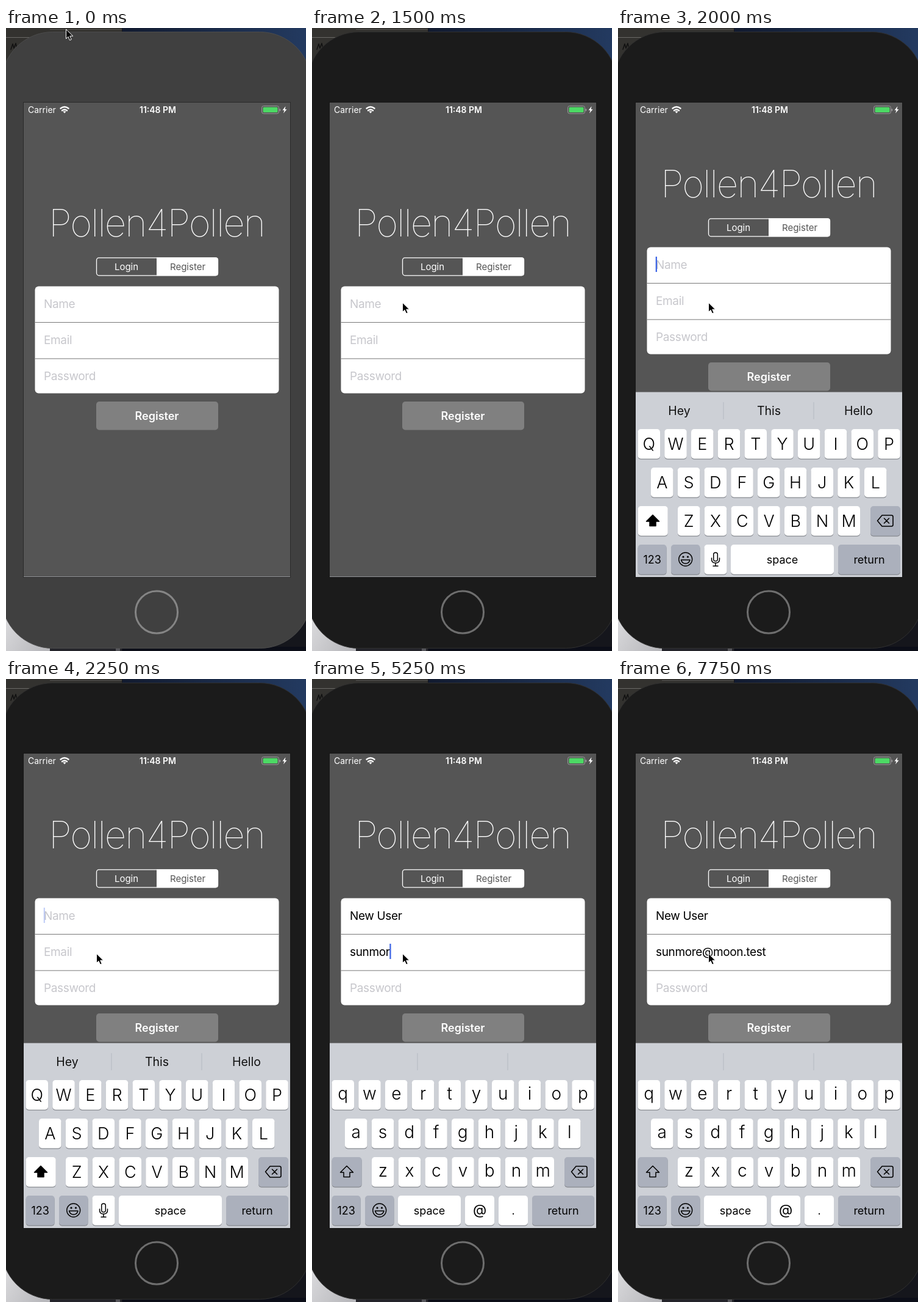
Animation of 492x1019 px, one loop 8000 ms. Source, as an HTML page:

```html
<!DOCTYPE html>
<html lang="en">
<head>
<meta charset="utf-8">
<title>Registration form</title>
<style>
  html, body { margin: 0; width: 100%; height: 100%; overflow: hidden; background: #111; }
  svg { display: block; width: 492px; height: 1019px; font-family: Inter, "Noto Sans", sans-serif; }
  .mid { text-anchor: middle; }
  .title { font-size: 62px; font-weight: 100; letter-spacing: -2px; }
  .field { font-size: 19px; letter-spacing: -.35px; }
  .keys { font-weight: 350; }
</style>
</head>
<body>
<svg id="stage" viewBox="0 0 492 1019"></svg>
<script>
const LOOP = 8000, STEP = 250;
const stage = document.getElementById('stage');
const NAME = 'New User', EMAIL = 'sunmore@moon.test';

// [time, letters typed]
const nameKeys = [[2500, 1], [2750, 2], [3000, 3], [3250, 6], [3500, 8]];
const emailKeys = [[4500, 1], [4750, 3], [5250, 6], [5500, 7], [6000, 8], [6250, 9],
  [6500, 11], [6750, 14], [7000, 16], [7250, 17]];
const hints = [[0, 'Hey,This,Hello'], [2500, '“N”,No,Not'], [2750, '“Ne”,New,Need'],
  [3000, '“New”,News,Newer'], [3250, '“Us”,User,Used'], [3750, ',,']];

const latest = (list, t, none) => list.reduce((v, [at, x]) => t >= at ? x : v, none);
const rect = (x, y, w, h, fill, r = 0, more = '') =>
  `<rect x="${x}" y="${y}" width="${w}" height="${h}" rx="${r}" fill="${fill}" ${more}/>`;
const text = (s, x, y, size, fill, more = 'class="mid"') =>
  `<text x="${x}" y="${y}" font-size="${size}" fill="${fill}" ${more}>${s}</text>`;
const path = (d, fill, stroke = 'none', w = 1) =>
  `<path d="${d}" fill="${fill}" stroke="${stroke}" stroke-width="${w}" stroke-linejoin="round" stroke-linecap="round"/>`;

function desktop() {
  return `<defs>
    <linearGradient id="sky"><stop stop-color="#121b30"/><stop offset="1" stop-color="#233a60"/></linearGradient>
    <linearGradient id="paper" x2="1" y2="1"><stop stop-color="#e8e8ea"/><stop offset="1" stop-color="#b4b4b8"/></linearGradient>
    <clipPath id="screen"><rect x="29" y="122" width="437" height="776"/></clipPath></defs>` +
    rect(0, 0, 492, 1019, '#15161c') +
    rect(0, 0, 190, 110, '#33322f') + rect(0, 15, 190, 1, '#6a6966') + rect(72, 2, 118, 1, '#555451') +
    path('M8 35l3-9 2 7 3-8 2 9', 'none', '#111', 1.5) +
    rect(191, 0, 301, 110, 'url(#sky)') +
    rect(0, 900, 72, 119, 'url(#paper)') + rect(72, 1012, 118, 7, '#24242a') +
    rect(180, 1012, 7, 7, '#55555a') + rect(191, 1012, 301, 7, '#0c0e18');
}

function phone(active) {
  const body = active ? '#1b1b1b' : '#404040';
  return rect(-7.5, 6.5, 508, 1008, body, 84, `stroke="${active ? '#303030' : '#4c4c4c'}"`) +
    rect(28, 121, 439, 778, active ? '#161616' : '#2a2a2a') +
    rect(29, 122, 437, 776, '#555') +
    `<circle cx="247" cy="955.5" r="34.5" fill="none" stroke="${active ? '#6e6e6e' : '#858585'}" stroke-width="3"/>`;
}

function statusBar() {
  return text('Carrier', 36, 139, 14, '#fff', '') +
    path('M89.5 131.5q6.5-5 13 0M92 135q4-3 8 0', 'none', '#fff', 2.4) +
    path('M93.5 136.5q2.5-1.5 5 0l-2.5 3z', '#fff') +
    text('11:48 PM', 249, 139, 14, '#fff', 'class="mid" font-weight="600"') +
    rect(419.5, 127.5, 28, 12.5, 'none', 3, 'stroke="#999"') +
    rect(421.5, 129.5, 24, 8.5, '#4cd964', 1.5) + rect(448.5, 132, 1.8, 4, '#999', 1) +
    path('M458.5 128l-5 6.5h3l-1.5 5 5.5-6.5h-3z', '#fff');
}

function field(id, value, hint, y) {
  return text(value || hint, 62, y, 19, value ? '#000' : '#c7c7cc', `class="field" id="${id}"`);
}

function form(name, email) {
  return text('Pollen4Pollen', 247, 341, 62, '#fff', 'class="mid title"') +
    rect(148.5, 375.8, 199, 29, 'none', 4, 'stroke="#fff" stroke-width="1.3"') +
    path('M247 375.2h97q4 0 4 4v22q0 4-4 4h-97z', '#fff') +
    text('Login', 197.5, 395.8, 15, '#fff') + text('Register', 298, 395.8, 15, '#555') +
    rect(47.5, 422.5, 400, 175, '#fff', 6) +
    rect(47.5, 481, 400, 1, '#777') + rect(47.5, 540.4, 400, 1, '#777') +
    field('name', name, 'Name', 458) + field('email', email, 'Email', 517) +
    field('password', '', 'Password', 576) +
    rect(148, 611, 200, 46.5, '#808080', 5) +
    text('Register', 247.5, 641, 18, '#fff', 'class="mid" font-weight="600"');
}

function key(x, y, w, label = '', size = 18, dark = false, drop = 6.5) {
  return rect(x, y + 1.2, w, 48.5, '#888b91', 5) + rect(x, y, w, 48.5, dark ? '#abb0bc' : '#fff', 5) +
    text(label, x + w / 2, y + 24 + drop, size, '#000');
}

function keyboard(t) {
  const upper = t < 2500, mail = t >= 3750;
  const row = (letters, x, y) => [...letters].map((c, i) =>
    key(x + i * 43.75, y, 36.5, upper ? c.toUpperCase() : c, upper ? 27 : 28, false, upper ? 9.5 : 8)).join('');
  const words = latest(hints, t).split(',');
  return rect(29, 595.5, 437, 303, '#cdd0d6') +
    rect(172.5, 612, 1, 28, '#b4b8bf') + rect(320.5, 612, 1, 28, '#b4b8bf') +
    words.map((w, i) => text(w, 100.5 + i * 147, 633, 19.5, '#111')).join('') +
    '<g class="keys">' + row('qwertyuiop', 32.5, 656) + row('asdfghjkl', 54, 719) + row('zxcvbnm', 98, 782) + '</g>' +
    key(32.7, 782, 49, '', 18, !upper) +
    path('M57 796.5l10.5 10.5h-5.5v7.5h-10v-7.5h-5.5z', upper ? '#000' : 'none', '#000', 1.5) +
    key(414, 782, 49, '', 18, true) +
    path('M425.5 806l7.5-9h15.5q2.5 0 2.5 2.5v13q0 2.5-2.5 2.5h-15.5zM436.5 802l8 8m0-8l-8 8', 'none', '#000', 1.6) +
    key(32.7, 845, 47, '123', 18, true) + key(87, 845, 47.5, '', 18, true) +
    '<circle cx="110.7" cy="869" r="11" fill="none" stroke="#000" stroke-width="1.4"/>' +
    '<circle cx="107" cy="865" r="1.6"/><circle cx="114.5" cy="865" r="1.6"/>' +
    path('M103.5 870h14.5q-1.5 6-7.2 6t-7.3-6z', 'none', '#000', 1.4) +
    (mail
      ? key(141, 845, 103, 'space') + key(251, 845, 48, '@', 23, false, 7) + key(306, 845, 48, '.')
      : key(141.5, 845, 37) + rect(156.7, 858, 6.6, 14, 'none', 3.3, 'stroke="#000" stroke-width="1.5"') +
        path('M153.5 867v2q0 6 6.5 6t6.5-6v-2M160 875v5M156 880h8', 'none', '#000', 1.5) +
        key(185, 845, 169, 'space')) +
    key(361, 845, 102, 'return', 18, true);
}

function pointer(t) {
  const p = Math.min(1, t / 1250), e = p * p * (3 - 2 * p);
  return `<g transform="translate(${98 + 50 * e} ${2 + 447 * e})">` +
    path('M.5.5v15l3.5-3.3 2.5 5.8 2.7-1.1-2.5-5.7h4.7z', '#000', '#fff') + '</g>';
}

// The caret is hidden until the first tap and fades out at the end of a blink
const caretAlpha = t => t < 1750 || t === 7750 ? 0 : t === 2250 || t === 7500 ? .3 : 1;

function draw(t) {
  const rise = t < 1750 ? 0 : t < 2000 ? .75 : 1;
  const name = NAME.slice(0, latest(nameKeys, t, 0));
  const email = EMAIL.slice(0, latest(emailKeys, t, 0));
  stage.innerHTML = desktop() + phone(t >= 1000) +
    `<g clip-path="url(#screen)">${statusBar()}
      <g transform="translate(0 ${-64 * rise})">${form(name, email)}
        <rect id="caret" width="2.3" height="25" fill="#3f66e6" opacity="${caretAlpha(t)}"/></g>
      <g transform="translate(0 ${302 * (1 - rise)})">${keyboard(t)}</g></g>` + pointer(t);

  const inEmail = t >= 3750;
  const typed = inEmail ? email : name;
  const width = typed ? document.getElementById(inEmail ? 'email' : 'name').getComputedTextLength() : 0;
  const caret = document.getElementById('caret');
  caret.setAttribute('x', 61.7 + width);
  caret.setAttribute('y', inEmail ? 497 : 438);
}

const start = performance.now();
let shown = -1;
function tick() {
  const t = Math.floor((performance.now() - start) % LOOP / STEP) * STEP;
  if (t !== shown) draw(shown = t);
  requestAnimationFrame(tick);
}
tick();
</script>
</body>
</html>
```
